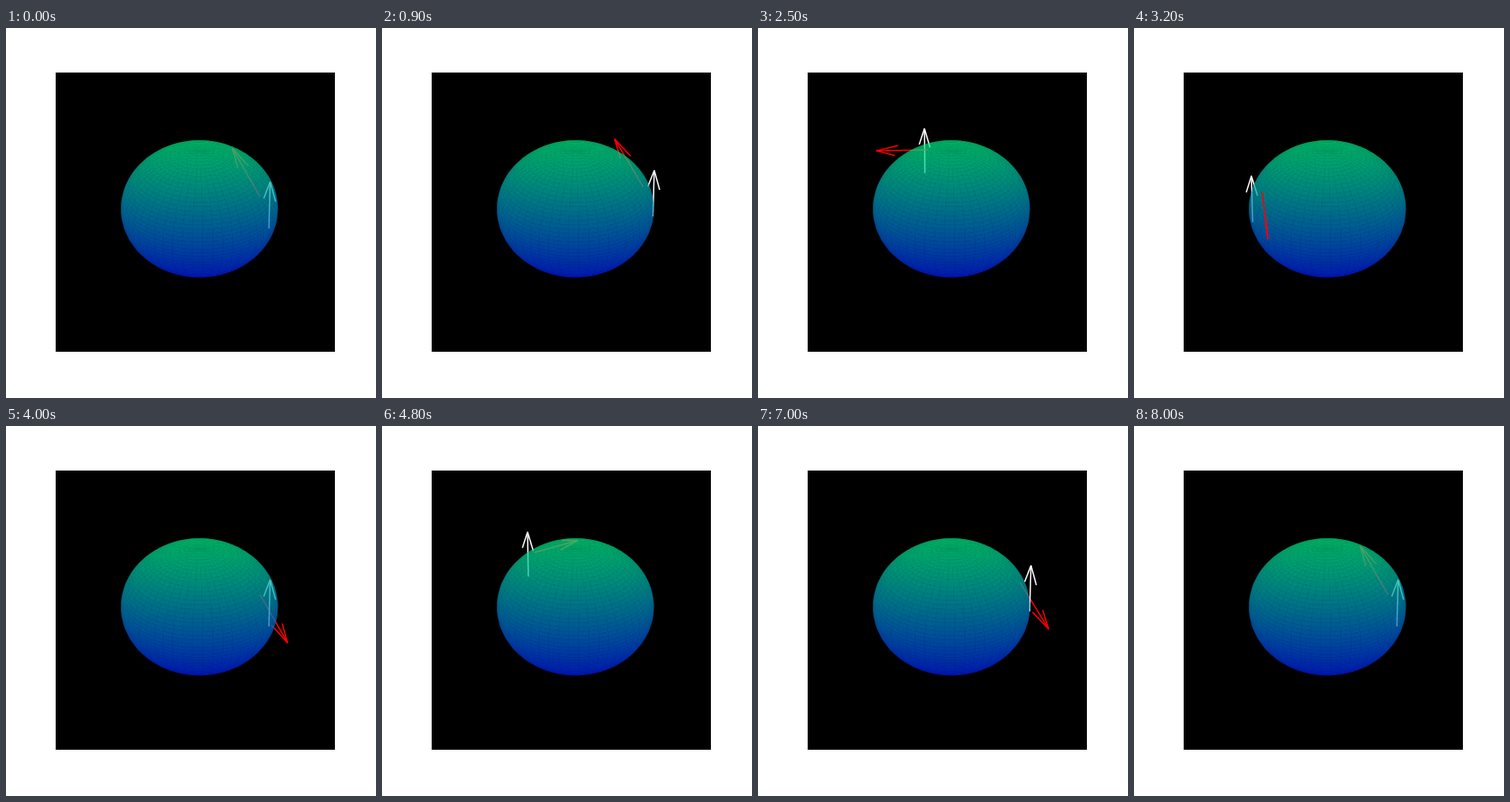
These frames come from a looping animation (432 by 432 pixels, 8.1 s). An HTML page with a canvas:

```html
<!DOCTYPE html>
<html lang="en">
<head>
<meta charset="utf-8">
<title>Parallel transport on a sphere</title>
<style>
html, body { margin: 0; width: 100%; height: 100%; overflow: hidden; background: #fff; }
canvas { display: block; width: 432px; height: 432px; }
</style>
</head>
<body>
<canvas id="stage" width="432" height="432"></canvas>
<script>
const SIZE = 432, FRAMES = 81, STEP = 100;
const { sin, cos, PI, hypot, atan2 } = Math;
const rad = deg => deg * PI / 180;
const BOX = { x: 58.32, y: 51.84, size: 326.16 };
const SCALE = BOX.size / 0.185;
const CX = BOX.x + BOX.size / 2 + SCALE * 0.0025;
const CY = BOX.y + BOX.size / 2 - SCALE * 0.0025;
const EYE = 10, RX = 0.5195, RZ = 0.43;
const C30 = cos(rad(30)), S30 = sin(rad(30));
const ALPHA = 0.5, MESH = 50;
const LENGTH = 0.8, HEAD = 0.4, SPREAD = rad(15);

// Perspective view from elevation 30, azimuth -60.
function project([x, y, z]) {
  const u = RX * (x * C30 + y * S30);
  const v = RX * (y * C30 - x * S30);
  const h = RZ * z;
  const depth = v * C30 - h * S30;
  const k = SCALE / (EYE + depth);
  return { x: CX + k * u, y: CY - k * (v * S30 + h * C30), depth };
}

const onSphere = (lat, lon) => [cos(lat) * cos(lon), cos(lat) * sin(lon), sin(lat)];

function makeSphere() {
  const canvas = document.createElement('canvas');
  canvas.width = canvas.height = SIZE;
  const g = canvas.getContext('2d');
  const facets = [];
  const lat = i => PI / 2 - PI * i / MESH;
  const lon = j => 2 * PI * j / MESH;
  let near = Infinity;
  for (let i = 0; i < MESH; i++) {
    for (let j = 0; j < MESH; j++) {
      const pts = [[i, j], [i + 1, j], [i + 1, j + 1], [i, j + 1]]
        .map(([a, b]) => project(onSphere(lat(a), lon(b))));
      near = Math.min(near, ...pts.map(p => p.depth));
      const depth = pts.reduce((sum, p) => sum + p.depth, 0) / 4;
      const level = ((sin(lat(i)) + sin(lat(i + 1))) / 2 + 1) / 2;
      facets.push({ pts, depth, level });
    }
  }
  facets.sort((a, b) => b.depth - a.depth);
  for (const { pts, level } of facets) {
    g.fillStyle = `rgba(0,${Math.round(255 * level)},${Math.round(255 * (1 - level / 2))},${ALPHA})`;
    g.beginPath();
    pts.forEach(p => g.lineTo(p.x, p.y));
    g.closePath();
    g.fill();
  }
  return { canvas, near };
}

// A north-pointing vector carried east along a latitude circle.
function makeArrow(lat, lon, color) {
  const turn = lon * sin(lat);
  const north = [-sin(lat) * cos(lon), -sin(lat) * sin(lon), cos(lat)];
  const east = [-sin(lon), cos(lon), 0];
  const dir = north.map((n, i) => n * cos(turn) + east[i] * sin(turn));
  const base = onSphere(lat, lon);
  const tip = base.map((b, i) => b + LENGTH * dir[i]);

  const flat = hypot(dir[0], dir[1]);
  const side = flat > 1e-9 ? [dir[0] / flat, dir[1] / flat] : [1, 0];
  const rise = atan2(dir[2], flat);
  const barb = angle => {
    const d = [side[0] * cos(angle), side[1] * cos(angle), sin(angle)];
    return tip.map((t, i) => t - LENGTH * HEAD * d[i]);
  };
  const end = project(tip);
  const starts = [base, barb(rise + SPREAD), barb(rise - SPREAD)].map(project);
  const depth = Math.min(end.depth, ...starts.map(p => p.depth));
  const draw = () => {
    ctx.strokeStyle = color;
    ctx.lineWidth = 1.5;
    for (const p of starts) {
      ctx.beginPath();
      ctx.moveTo(p.x, p.y);
      ctx.lineTo(end.x, end.y);
      ctx.stroke();
    }
  };
  return { depth, draw };
}

const ctx = document.getElementById('stage').getContext('2d');
const ball = makeSphere();
const sphere = { depth: ball.near, draw: () => ctx.drawImage(ball.canvas, 0, 0) };

function render(time) {
  const step = Math.floor(time / STEP) % FRAMES;
  const lon = 8 * PI * (step / (FRAMES - 1)) ** 2;
  ctx.fillStyle = '#fff';
  ctx.fillRect(0, 0, SIZE, SIZE);
  ctx.fillStyle = '#000';
  ctx.fillRect(58, 52, 326, 326);
  // Whole objects are layered by their nearest point.
  [sphere, makeArrow(0, lon, '#fff'), makeArrow(rad(30), lon, '#f00')]
    .sort((a, b) => b.depth - a.depth)
    .forEach(item => item.draw());
}

const start = performance.now();
function tick() {
  render(performance.now() - start);
  requestAnimationFrame(tick);
}
tick();
</script>
</body>
</html>
```
